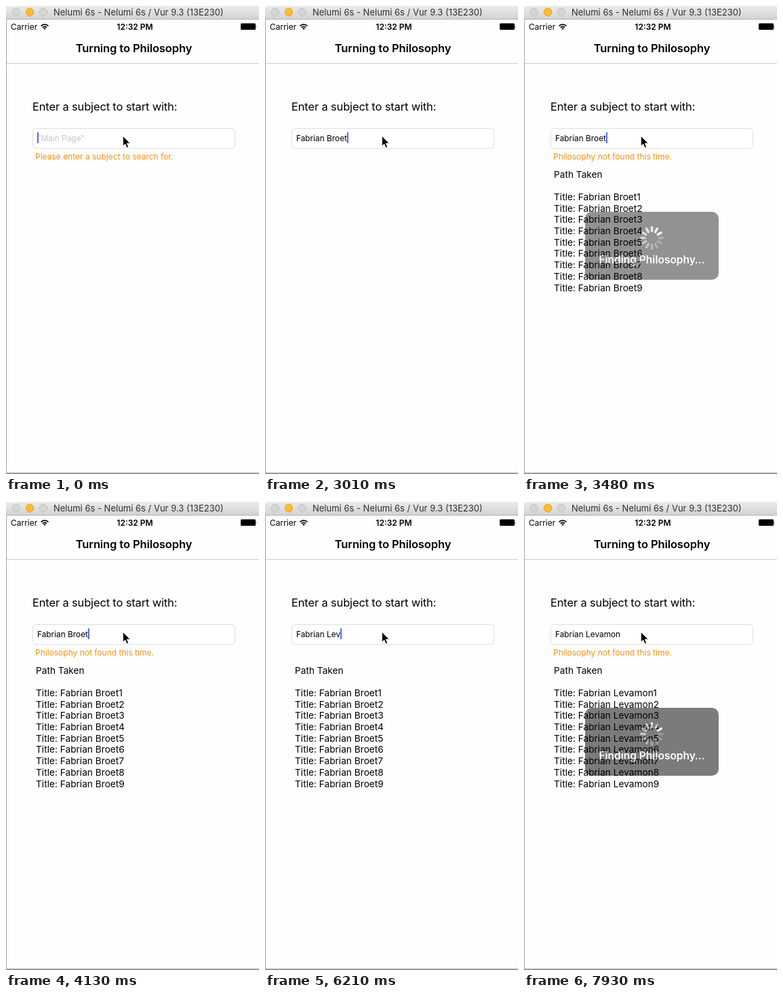
Recreate the animation shown at these times as an HTML page. Size 373 by 689 pixels, loop 7.99 s.

```html
<!DOCTYPE html>
<html lang="en">
<head>
<meta charset="utf-8">
<title>Subject search</title>
<style>
  html, body { margin: 0; width: 100%; height: 100%; overflow: hidden; background: #fefefe; }
  svg { display: block; width: 373px; height: 689px; }
  text { font-family: Inter, "Open Sans", sans-serif; white-space: pre; }
  .small { font-size: 11.85px; }
  .list { font-size: 13.7px; }
</style>
</head>
<body>
<svg viewBox="0 0 373 689">
  <defs>
    <linearGradient id="bar" x2="0" y2="1">
      <stop stop-color="#ebebeb"/><stop offset="1" stop-color="#d3d3d3"/>
    </linearGradient>
  </defs>

  <!-- window frame -->
  <rect width="373" height="689" fill="#fefefe"/>
  <rect y="20" width="1" height="669" fill="#a3a3a3"/>
  <rect y="687" width="373" height="2" fill="#999"/>
  <rect width="373" height="19" fill="url(#bar)"/>
  <rect y="19" width="373" height="1" fill="#b4b4b4"/>
  <g fill="#d5d5d5" stroke="#c2c2c2">
    <circle cx="15" cy="9" r="5.8"/>
    <circle cx="35" cy="9" r="5.8" fill="#fdbc2f" stroke="#e6a630"/>
    <circle cx="55" cy="9" r="5.8"/>
  </g>
  <text x="70" y="14" font-size="13" fill="#303030">Nelumi 6s - Nelumi 6s / Vur 9.3 (13E230)</text>

  <!-- status bar -->
  <text x="7" y="34.5" font-size="12">Carrier</text>
  <g fill="none" stroke="#000" stroke-width="1.7">
    <path d="M51.6 29.4a7.6 7.6 0 0 1 10.8 0M53.8 31.7a4.5 4.5 0 0 1 6.4 0"/>
    <path d="M57 35l-1.9-1.9a2.7 2.7 0 0 1 3.8 0z" fill="#000" stroke="none"/>
  </g>
  <text x="190" y="34.5" font-size="12" font-weight="600" text-anchor="middle">12:32 PM</text>
  <rect x="346" y="25.6" width="22" height="9.4" rx="1.5"/>
  <path d="M368.6 28.7q1.8 1.6 0 3.2z"/>

  <!-- navigation bar -->
  <text x="188.5" y="68" font-size="16.5" font-weight="600" letter-spacing="-.1" text-anchor="middle">Turning to Philosophy</text>
  <rect x="1" y="84" width="372" height="1" fill="#cfcfcf"/>

  <!-- form -->
  <text x="39" y="154" font-size="16.5" letter-spacing="-.16">Enter a subject to start with:</text>
  <rect x="39.5" y="180.5" width="298" height="29" rx="4.5" fill="#fff" stroke="#dedede"/>
  <text id="hint" class="small" x="46" y="198.5" fill="#c7c7cd">"Main Page"</text>
  <text id="field" class="small" x="46" y="198.5"></text>
  <rect id="caret" y="186" width="2" height="16" fill="#4a6fe8"/>
  <text id="note" x="43" y="226" font-size="12" fill="#f7900f"></text>
  <g id="list"></g>

  <!-- progress box -->
  <g id="hud">
    <rect x="90" y="303" width="197" height="100" rx="10" fill-opacity=".8"/>
    <g id="spinner" transform="translate(188.5 341.5)" stroke="#fff" stroke-width="3.4" stroke-linecap="round"></g>
    <text x="188.5" y="379" font-size="15.5" font-weight="600" fill="#fff" text-anchor="middle">Finding Philosophy…</text>
  </g>

  <!-- mouse pointer -->
  <path d="M172.3 191.2v15.2l3.4-3.2 2.3 5.6 2.7-1.1-2.3-5.5h4.7z" stroke="#fff" stroke-width="1"/>
</svg>

<script>
const LOOP = 7990;
const FIRST = 'Fabrian Broet', SECOND = 'Levamon';
const TYPED = [1190, 1310, 1420, 1600, 1660, 1770, 2000, 2180, 2350, 2530, 2710, 2830, 3010];
const DELETED = [4360, 4540, 4720, 4900, 5200];
const ADDED = [5550, 5730, 6210, 6510, 6870, 7040, 7220];
const FOUND = [3420, 7870];                   // moments when a result list arrives
const HUD = [[3310, 3430], [7745, 7900]];     // show and hide calls

const NS = 'http://www.w3.org/2000/svg';
const [hint, field, caret, note, list, hud, spinner] =
  ['hint', 'field', 'caret', 'note', 'list', 'hud', 'spinner'].map(id => document.getElementById(id));

function add(parent, tag, attrs) {
  const el = parent.appendChild(document.createElementNS(NS, tag));
  for (const k in attrs) el.setAttribute(k, attrs[k]);
  return el;
}

const rows = Array.from({ length: 11 }, (_, i) =>
  add(list, 'text', { class: 'list', x: 44, y: 252.5 + i * 16.7 }));
const petals = Array.from({ length: 12 }, (_, i) =>
  add(spinner, 'path', { d: 'M0-10.2V-15.8', transform: `rotate(${i * 30})` }));

const count = (times, t) => times.filter(at => t >= at).length;
const ramp = (t, start, length) => Math.min(1, Math.max(0, (t - start) / length));
const ease = x => x * x * (3 - 2 * x);

function setText(el, text) {
  if (el.textContent !== text) el.textContent = text;
}

function caretAlpha(t) {
  const out = start => 1 - ramp(t, start, 130);
  if (t < TYPED[0]) return Math.max(out(570), ramp(t, 1050, 130));
  if (t < DELETED[0]) return Math.max(out(3580), ramp(t, 4030, 100));
  return out(7725);
}

function noteText(t) {
  if (t < TYPED[0]) return 'Please enter a subject to search for.';
  const found = t >= FOUND[1] || (t >= FOUND[0] && t < DELETED[0]);
  return found ? 'Philosophy not found this time.' : '';
}

function rowText(i, t) {
  if (t < FOUND[0] || i === 1) return '';
  if (i === 0) return 'Path Taken';
  const name = t < FOUND[1] ? FIRST : 'Fabrian ' + SECOND;
  return `Title: ${name}${i - 1}`;
}

function draw(t) {
  const value = FIRST.slice(0, count(TYPED, t) - count(DELETED, t)) + SECOND.slice(0, count(ADDED, t));
  setText(field, value);
  hint.style.display = value ? 'none' : '';
  caret.setAttribute('x', 46 + (value ? field.getComputedTextLength() : 0));
  caret.setAttribute('opacity', caretAlpha(t));
  setText(note, noteText(t));
  rows.forEach((row, i) => setText(row, rowText(i, t)));

  const [show, hide] = HUD[t < 5000 ? 0 : 1];
  hud.setAttribute('opacity', ease(ramp(t, show, 300)) - ease(ramp(t, hide, 300)));
  const head = Math.floor(Math.max(0, t - show) / 83.3);
  petals.forEach((petal, i) => {
    const age = (head - i + 120) % 12;
    petal.setAttribute('opacity', Math.max(.25, 1 - age * .08));
  });
}

function frame() {
  draw(performance.now() % LOOP);
  requestAnimationFrame(frame);
}
frame();
</script>
</body>
</html>
```
